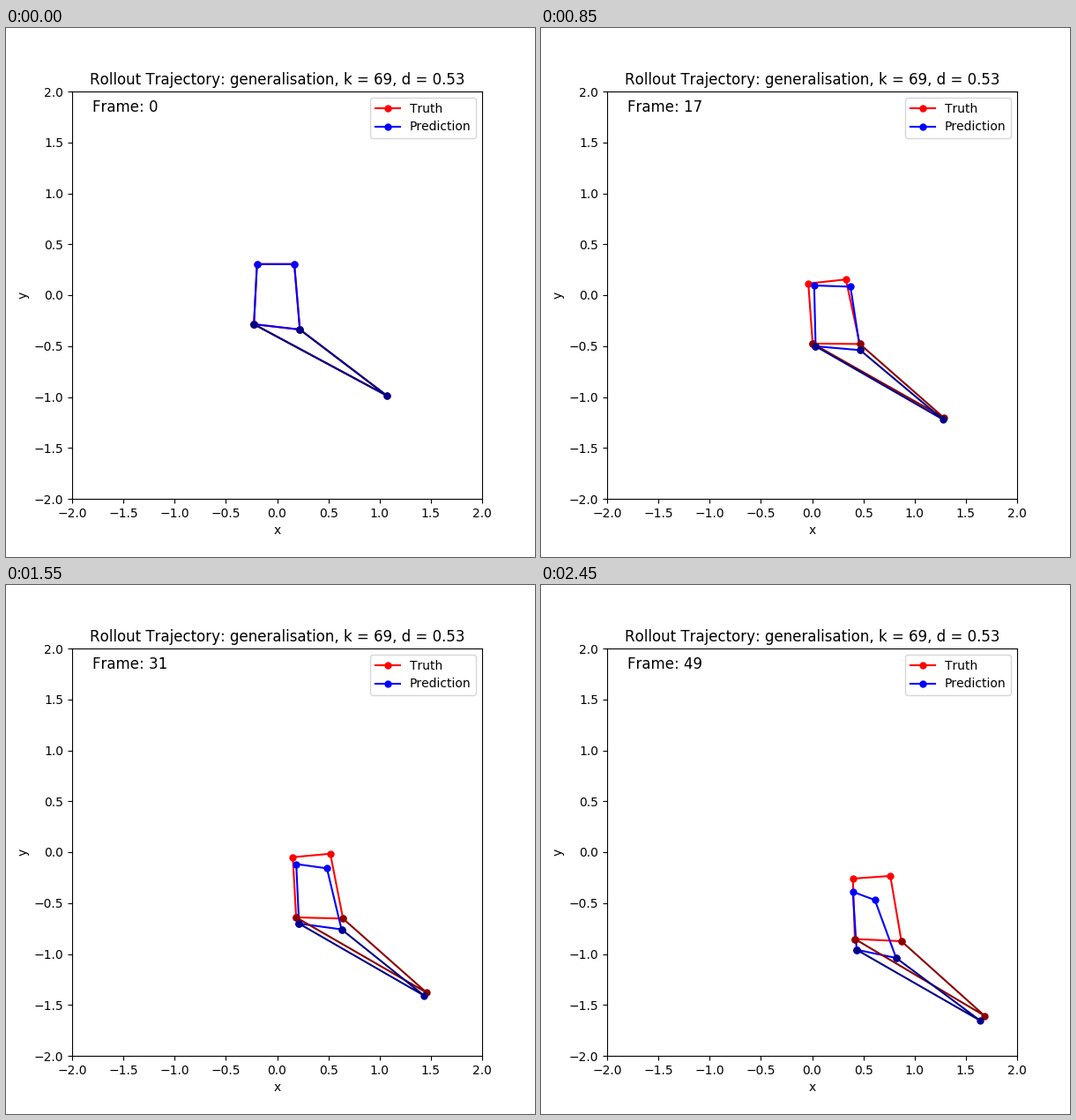
Write a matplotlib script that moves like this. It is 600 by 600 pixels and loops after 2500 ms.

```python
import numpy as np
import matplotlib.pyplot as plt
from matplotlib.animation import FuncAnimation

FRAMES = 50
INTERVAL = 50
plt.rcParams["text.kerning_factor"] = 6

# Corners in stage pixels: top left, top right, lower right, lower left, tip.
START = [(284.7, 267.8), (327, 267.8), (333.3, 342), (281.2, 336), (432, 417)]


def to_data(points):
    x, y = np.array(points, float).T
    return np.column_stack([(x - 75) / 116.25 - 2, 2 - (y - 72) / 115.5])


def glide(origin, end, settle):
    """Steady drift from origin to end, eased in from the shared start pose.

    settle holds the easing times of x and y in frames.
    """
    start, origin, end = map(to_data, (START, origin, end))
    t = np.arange(FRAMES)[:, None, None]
    drift = origin + (end - origin) * t / (FRAMES - 1)
    return drift + (start - origin) * np.exp(-(t / np.array(settle)) ** 2)


truth = glide(
    [(276.4, 266.9), (319, 261.4), (336.5, 334.2), (282.7, 334.8), (432, 417)],
    [(353.7, 333), (396.2, 330), (408.8, 404), (356, 401.5), (503, 488.5)],
    settle=(5, 5))
prediction = glide(
    [(287, 262.3), (338.7, 259.5), (342.3, 334.8), (288.2, 333), (433.7, 417.3)],
    [(353.7, 348), (378.7, 357.3), (402.8, 423), (358, 413.7), (498, 494)],
    settle=(12, 5.5))

fig, ax = plt.subplots(figsize=(6, 6), dpi=100)
ax.set(xlim=(-2, 2), ylim=(-2, 2), xlabel="x", ylabel="y")
ax.set_title("Rollout Trajectory: generalisation, k = 69, d = 0.53")
counter = ax.text(-1.8, 1.8, "", fontsize=12)


def chain(color, label=None):
    return ax.plot([], [], "o-", color=color, markersize=5, label=label)[0]


bodies = [chain("red", "Truth"), chain("blue", "Prediction")]
arms = [chain("darkred"), chain("darkblue")]
ax.legend(loc="upper right")

BODY = [3, 0, 1, 2, 3]
ARM = [2, 4, 3]


def update(frame):
    counter.set_text(f"Frame: {frame}")
    for path, body, arm in zip((truth, prediction), bodies, arms):
        body.set_data(*path[frame][BODY].T)
        arm.set_data(*path[frame][ARM].T)
    return [counter, *bodies, *arms]


anim = FuncAnimation(fig, update, frames=FRAMES, interval=INTERVAL,
                     repeat=True, repeat_delay=0)
plt.show()
```
